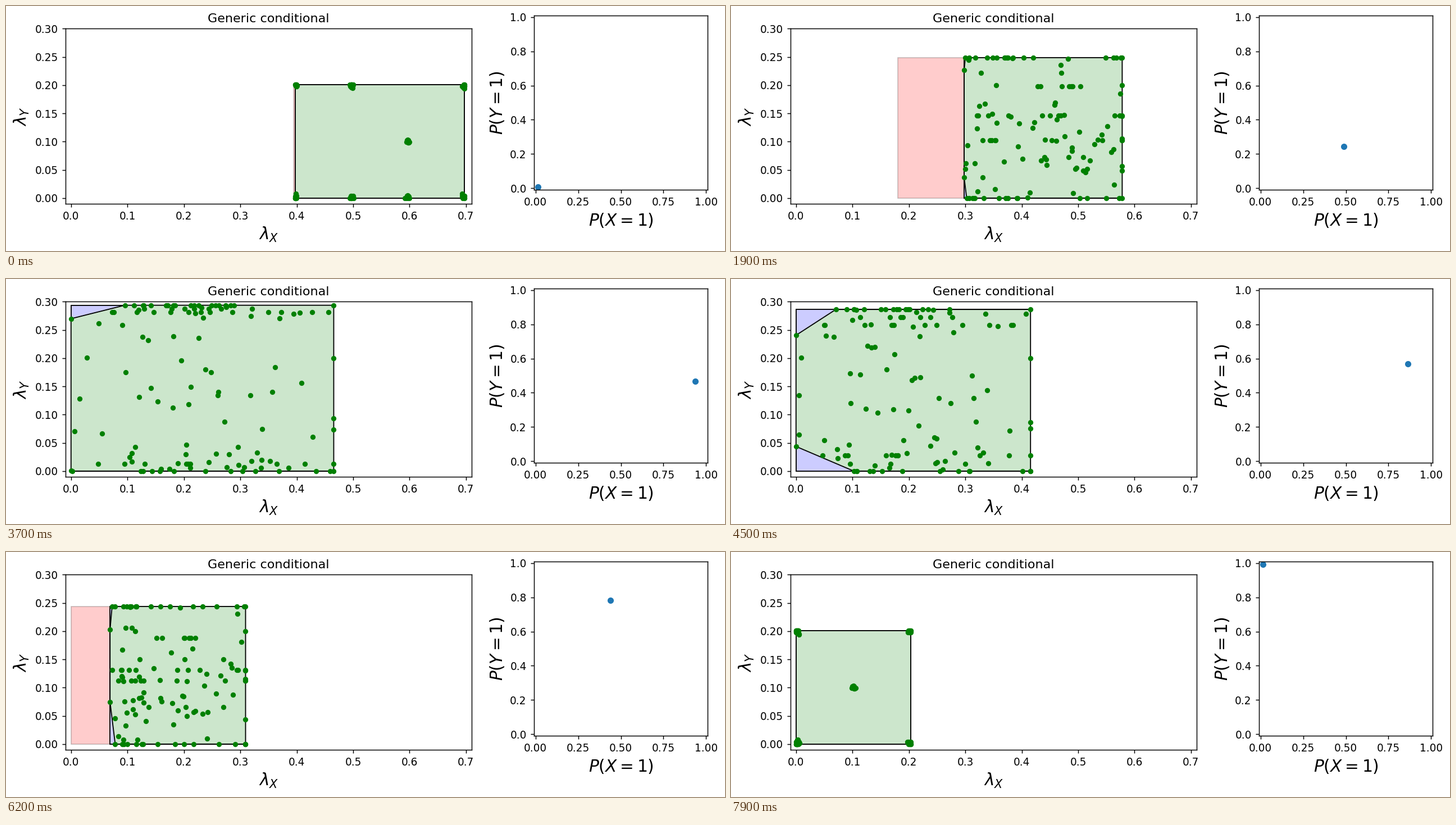
Animation of 1280x436 px, one loop 8000 ms. Source, as a matplotlib script:

```python
import numpy as np
import matplotlib.pyplot as plt
from matplotlib.animation import FuncAnimation
from matplotlib.patches import Polygon

W, H, DPI = 1280, 436, 128
FRAMES = 80
K = 400 / 3 / DPI  # point scale

plt.rcParams.update({
    "font.family": "DejaVu Sans",
    "font.size": 10 * K,
    "axes.linewidth": 0.8 * K,
    "axes.titlesize": 12 * K,
    "axes.titlepad": 6 * K,
    "axes.labelsize": 16 * K,
    "axes.labelpad": 4 * K,
})
for side in ("xtick", "ytick"):
    plt.rcParams.update({
        f"{side}.major.size": 3.5 * K,
        f"{side}.major.width": 0.8 * K,
        f"{side}.major.pad": 3.5 * K,
        f"{side}.labelsize": 10 * K,
    })

fig = plt.figure(figsize=(W / DPI, H / DPI), dpi=DPI, facecolor="white")


def add_axes(left, top, right, bottom):
    return fig.add_axes([left / W, 1 - bottom / H,
                         (right - left) / W, (bottom - top) / H])


ax = add_axes(105.7, 40.4, 828.9, 351.9)
ax.set(xlim=(-0.01, 0.71), ylim=(-0.01, 0.3), title="Generic conditional",
       xlabel=r"$\lambda_X$", ylabel=r"$\lambda_Y$")
ax.set_xticks(np.arange(8) / 10)
ax.set_yticks(np.arange(7) / 20)

pax = add_axes(939.7, 16.9, 1249.4, 327.1)
pax.set(xlim=(-0.01, 1.01), ylim=(-0.01, 1.01),
        xlabel="$P(X=1)$", ylabel="$P(Y=1)$")
pax.set_xticks(np.arange(5) / 4)
pax.set_yticks(np.arange(6) / 5)


def add_patch(**style):
    patch = Polygon(np.zeros((4, 2)), closed=True, linewidth=K, **style)
    return ax.add_patch(patch)


outer = add_patch(facecolor="red", edgecolor="black", alpha=0.2)
middle = add_patch(facecolor="#ccccff", edgecolor="black")
inner = add_patch(facecolor="#cce6cc", edgecolor="black")
dots, = ax.plot([], [], "o", color="green", ms=4 * K, mew=K)
marker, = pax.plot([], [], "o", color="C0", ms=5 * K, mew=K)

# Each dot mixes values at the extremes of the two probabilities
N = 120
rng = np.random.default_rng(12)
kind = np.arange(N) % 8
A = np.array([.4, .5, .7, .6, .4, .5, .6, .7])[kind]
C = np.where(kind < 3, .2, np.where(kind == 3, .1, 0))
B = np.where(kind == 3, .1, .2 * (rng.random(N) < .35))
ease = np.clip(rng.uniform(-.35, 1.6, N), 0, 1)
D = .3 * ease ** 2 * (3 - 2 * ease)
shift = rng.random(N) ** 1.5
jx = rng.normal(0, .25, N)
jy = rng.normal(0, .2, N) * (rng.random(N) < .45)


def probabilities(n):
    """X rises to one and falls back while Y rises all the way."""
    last = FRAMES - 1
    px = .0125 + .025 * min(n, last - n)
    return px, px / 2 if n < FRAMES / 2 else 1 - px / 2


def left_side(px, py, top):
    """Corners of the bent left side, from bottom to top."""
    base = .4 * (1 - py)
    e = max(0, px - .48)
    late = .14 * max(0, py - .65)
    low = 1.05 * e ** 2 * np.clip(5 * (.66 - py), 0, 1)

    left = max(0, base - .6 * e - late)
    xl = max(left, base - low - late / 2)
    xh = max(left, base - .32 * e + .14 * e ** 2 - .8 * late)
    yh = top - (xh - left) * 2 * (1 - px) / max(px - .4375, .1)
    yl = min(yh, (xl - left) * .163 / max(e, .02))
    return [(xl, 0), (left, yl), (left, yh), (xh, top)]


def box(left, right, top):
    return [(left, 0), (left, top), (right, top), (right, 0)]


def draw(n):
    px, py = probabilities(n)
    right, top = .7 - .5 * py, .2 + .1 * px
    bend = left_side(px, py, top)
    left = bend[1][0]

    outer.set_xy(box(max(0, .4 - .9 * py), right, top))
    middle.set_xy(box(left, right, top))
    inner.set_xy(bend + [(right, top), (right, 0)])

    gap = .4 * (1 - py) - left
    x = (1 - py) * A + py * B - gap * shift + jx * py * (1 - py)
    y = (1 - px) * C + px * D + jy * px * (1 - px)
    y = np.clip(y, 0, top)
    bend_x, bend_y = zip(*bend)
    edge = np.interp(y, bend_y, bend_x)
    x = np.minimum(edge + abs(x - edge), right)

    side = [(right, v) for v in (0, .1 * px, .2, top)]
    cx, cy = np.array(bend + side).T
    dots.set_data(np.r_[x, cx], np.r_[y, cy])
    marker.set_data([px], [py])
    return outer, middle, inner, dots, marker


anim = FuncAnimation(fig, draw, frames=FRAMES, interval=100,
                     init_func=lambda: draw(0), repeat=True, repeat_delay=0)
plt.show()
```
